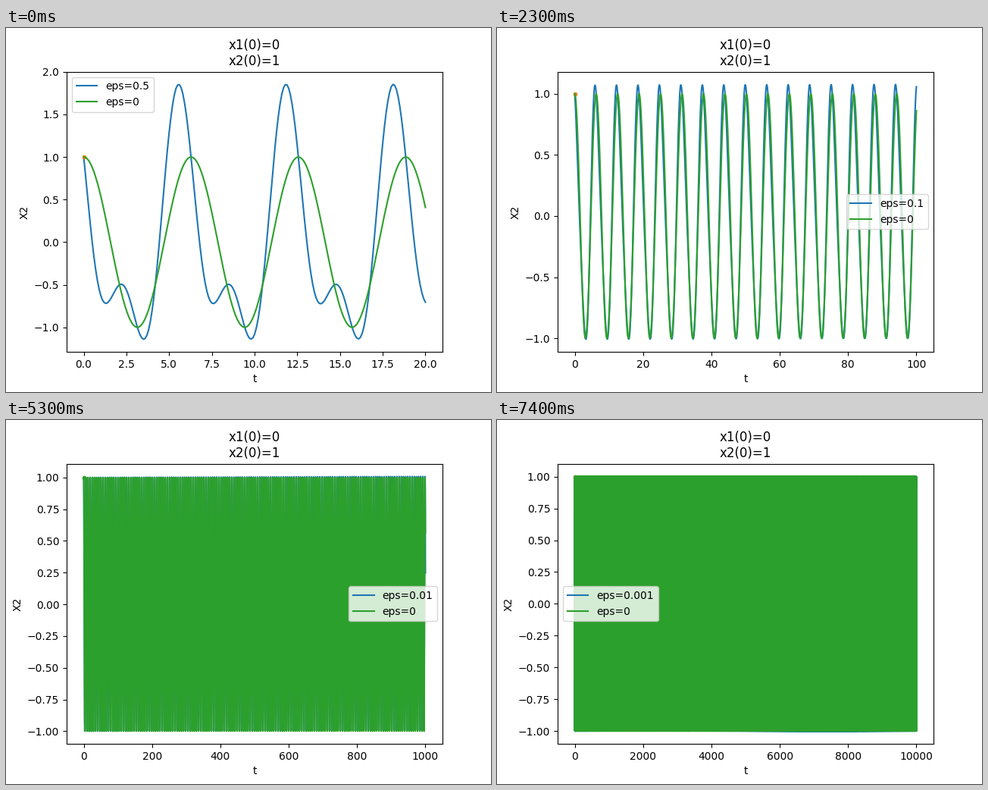
Write a matplotlib script that moves like this. It is 640 px wide and 480 px high and loops after 8 s.

```python
import numpy as np
import matplotlib.pyplot as plt
from matplotlib.animation import FuncAnimation

plt.rcParams["font.family"] = "DejaVu Sans"
plt.rcParams["agg.path.chunksize"] = 20000

STEP = 0.1
DRIFT = 1.00032  # phase lead of the perturbed oscillator

# eps, end time, legend place, start marker colour, frames shown
SCENES = [
    (0.5, 20, "upper left", "C1", 1),
    (0.1, 100, "center right", "C1", 6),
    (0.01, 1000, "center right", "C2", 6),
    (0.001, 10000, "center left", "C1", 3),
]


def perturbed(t, eps):
    """Oscillator with x2(0) = 1 under a weak cos^2 forcing."""
    k = 4 * eps / 3
    s = DRIFT * t
    return np.cos(s) - k * (np.sin(s) + np.sin(2 * t))


def build_scene(fig, eps, end, place, dot):
    ax = fig.add_subplot(label=f"eps{eps}")
    t = np.linspace(0, end, round(end / STEP) + 1)
    ax.plot(t, perturbed(t, eps), "C0", label=f"eps={eps}")
    ax.plot(0, 1, ".", color=dot)
    ax.plot(t, np.cos(t), "C2", label="eps=0")
    ax.set_title("x1(0)=0\nx2(0)=1")
    ax.set_xlabel("t")
    ax.set_ylabel("X2")
    ax.legend(loc=place)
    return ax


fig = plt.figure(figsize=(6.4, 4.8), dpi=100)
axes = [build_scene(fig, *scene[:4]) for scene in SCENES]
order = np.repeat(np.arange(len(SCENES)), [scene[4] for scene in SCENES])


def update(frame):
    for i, ax in enumerate(axes):
        ax.set_visible(i == order[frame])
    return axes


anim = FuncAnimation(fig, update, frames=len(order), interval=500,
                     init_func=lambda: update(0), repeat=True, repeat_delay=0)
plt.show()
```
